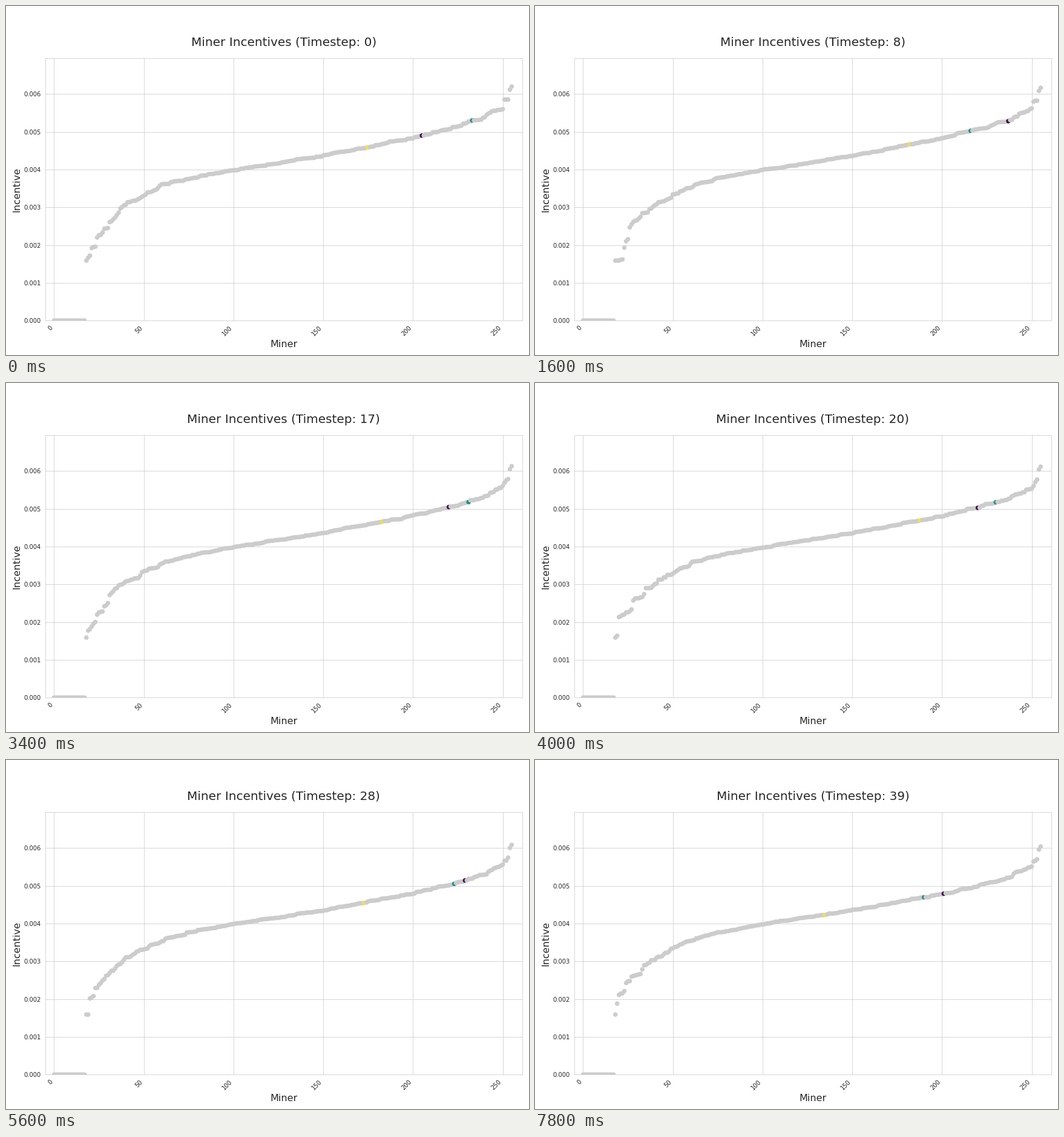
These frames come from a looping animation (864x576 px, 8 s). A matplotlib script:

```python
import numpy as np
import matplotlib.pyplot as plt
from matplotlib.animation import FuncAnimation

W, H, DPI = 864, 576, 72
MINERS, IDLE, LEADERS, STEPS = 256, 18, 253, 40
GREY, INK = "0.8", "0.15"

# Key points of the sorted curve: rank, incentive x 0.001
KEY_RANKS = [18, 20, 24, 30, 40, 50, 62, 80, 100, 150,
             200, 225, 240, 248, 253, 254, 255]
KEY_LEVELS = [1.59, 1.92, 2.27, 2.64, 3.07, 3.32, 3.60, 3.81, 3.98, 4.36,
              4.81, 5.10, 5.33, 5.54, 5.78, 6.04, 6.12]

# Ranks the highlighted miners pass through
KEY_STEPS = [0, 8, 13, 20, 28, 34, 39]
TRACKED = {
    "#440154": [205, 237, 220, 220, 229, 211, 201],
    "#21918c": [233, 216, 233, 230, 223, 209, 190],
    "#fde725": [175, 182, 176, 188, 173, 157, 135],
}

plt.rcParams.update({
    "font.family": "DejaVu Sans",
    "text.color": INK, "axes.labelcolor": INK,
    "xtick.color": INK, "ytick.color": INK,
    "axes.edgecolor": GREY, "axes.linewidth": 0.8, "axes.axisbelow": True,
    "grid.color": GREY, "grid.linewidth": 0.8,
    "xtick.major.size": 0, "ytick.major.size": 0,
    "xtick.major.pad": 7, "ytick.major.pad": 7,
})

rank = np.arange(MINERS)


def drift(r):
    """Change over the whole run: the low end gains, the high end loses."""
    u = np.maximum(r - IDLE, 0) / 3
    return 0.35 * u * np.exp(1 - u) - 0.16 * (r / MINERS) ** 4


def incentives(step):
    """Sorted incentives; shuffled ranks give the curve its small stairs."""
    rng = np.random.default_rng(step)
    r = rank.astype(float)
    noisy = r[IDLE + 1:LEADERS] + rng.normal(0, 2, LEADERS - IDLE - 1)
    r[IDLE + 1:LEADERS] = np.sort(np.clip(noisy, IDLE, LEADERS))
    t = step / (STEPS - 1) - 0.5
    value = np.interp(r, KEY_RANKS, KEY_LEVELS) + t * drift(r)
    value[:IDLE] = 0
    return np.maximum.accumulate(value) / 1000


def colours(step):
    result = [GREY] * MINERS
    for colour, path in TRACKED.items():
        result[int(round(np.interp(step, KEY_STEPS, path)))] = colour
    return result


fig = plt.figure(figsize=(W / DPI, H / DPI), dpi=DPI, facecolor="white")
left, right, top, bottom = 64.6, 853.2, 86.2, 519.2
ax = fig.add_axes([left / W, 1 - bottom / H,
                   (right - left) / W, (bottom - top) / H])
ax.set_xlim(-5, MINERS + 5)
ax.set_ylim(0, 0.00695)
ax.set_xticks(range(0, 251, 50))
ax.set_yticks(np.arange(7) / 1000)
ax.yaxis.set_major_formatter("{x:.3f}")
ax.tick_params(labelsize=10)
plt.setp(ax.get_xticklabels(), rotation=45, ha="right")
ax.set_xlabel("Miner", fontsize=16)
ax.set_ylabel("Incentive", fontsize=16)
ax.grid(True)
dots = ax.scatter(rank, incentives(0), s=36, linewidths=1.5, c=colours(0))


def draw(step):
    dots.set_offsets(np.column_stack([rank, incentives(step)]))
    dots.set_facecolor(colours(step))
    ax.set_title(f"Miner Incentives (Timestep: {step})", fontsize=20, pad=20)
    return [dots]


anim = FuncAnimation(fig, draw, frames=STEPS, init_func=lambda: draw(0),
                     interval=200, repeat=True, repeat_delay=0)
plt.show()
```
